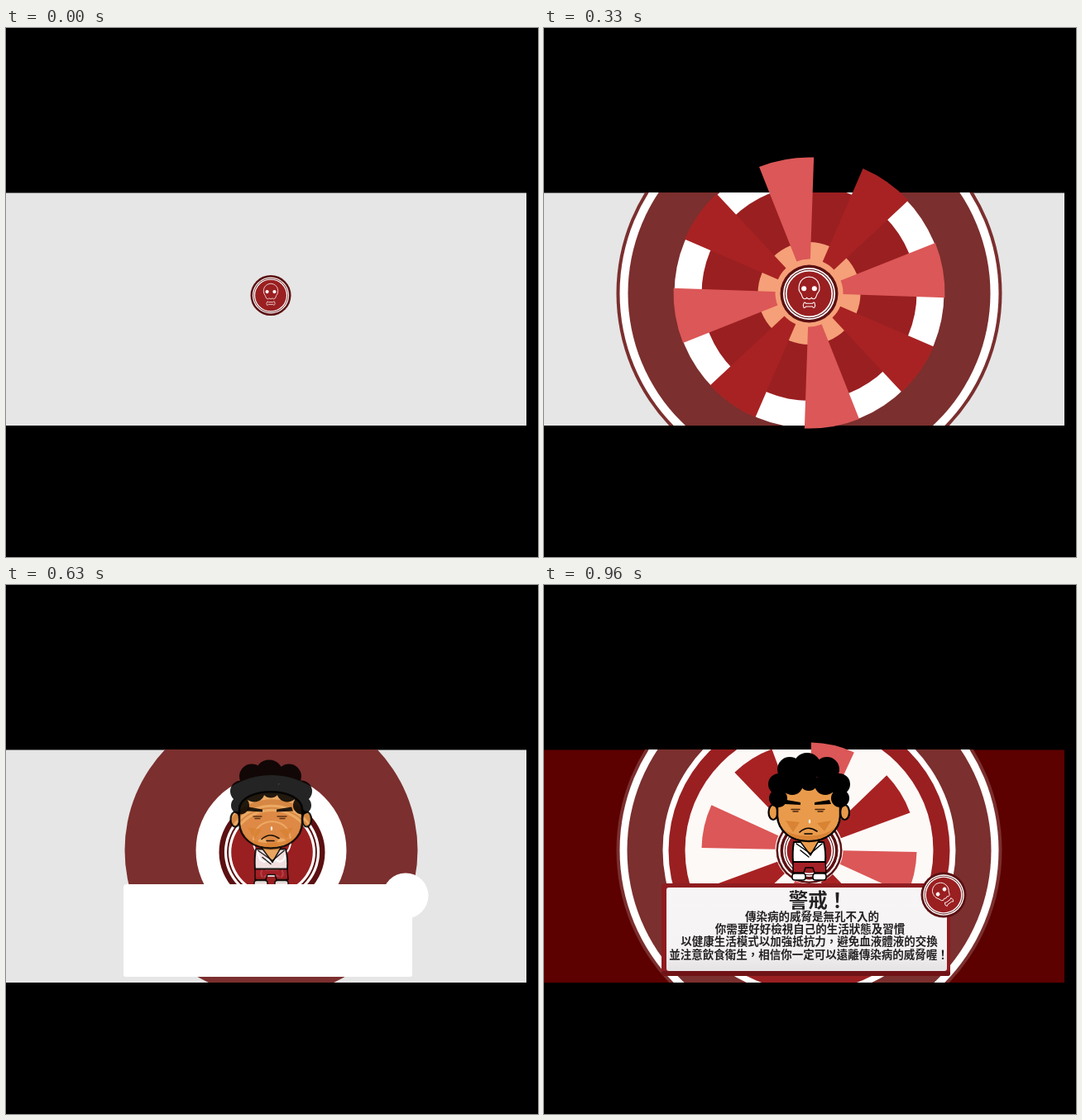
An HTML page with a canvas for the animation above (990 ms loop, 643 px wide and 640 px high).

```html
<!DOCTYPE html>
<html lang="zh-Hant">
<head>
<meta charset="utf-8">
<style>
html, body { margin: 0; width: 100%; height: 100%; overflow: hidden; background: #000; }
canvas { display: block; }
</style>
</head>
<body>
<canvas id="stage" width="643" height="640"></canvas>
<script>
const g = document.getElementById('stage').getContext('2d');
const CX = 320.5, CY = 321, TAU = Math.PI * 2, DEG = Math.PI / 180;
const DARK = '#7b2f2e', RED = '#9a1f21', DEEP = '#5c1012', WHITE = '#ffffff';
const FONT = '"Noto Sans CJK TC", "Noto Sans CJK", sans-serif';

// Piecewise linear lookup over [time, value, time, value, ...]
function at(k, t) {
  if (t <= k[0]) return k[1];
  for (let i = 2; i < k.length; i += 2) {
    if (t <= k[i]) return k[i - 1] + (k[i + 1] - k[i - 1]) * (t - k[i - 2]) / (k[i] - k[i - 2]);
  }
  return k[k.length - 1];
}

function mix(a, b, p) {
  const ch = (c, i) => parseInt(c.slice(i, i + 2), 16);
  return 'rgb(' + [1, 3, 5].map(i => Math.round(ch(a, i) + (ch(b, i) - ch(a, i)) * p)).join() + ')';
}

let tint = 0;
const ink = c => mix(c, WHITE, tint);

function paint(path, fill, line, width = 1.5) {
  if (fill) { g.fillStyle = ink(fill); g.fill(path); }
  if (line) { g.strokeStyle = ink(line); g.lineWidth = width; g.stroke(path); }
}

function oval(x, y, rx, ry = rx) {
  const p = new Path2D();
  p.ellipse(x, y, rx, ry, 0, 0, TAU);
  return p;
}

function box(x, y, w, h, r) {
  const p = new Path2D();
  p.roundRect(x, y, w, h, r);
  return p;
}

const disc = (x, y, r, c) => { if (r > 0) paint(oval(x, y, r), c); };

const skull = new Path2D('M-10 0C-15 -5 -14 -20 0 -21C14 -20 15 -5 10 0L8 5Q5 8 3 5Q0 8 -3 5Q-5 8 -8 5Z');
const bone = new Path2D('M-4 12L4 12Q7 9 7 13Q8 15 7 16Q6 19 4 16L-4 16Q-7 19 -7 16Q-8 14 -7 13Q-6 9 -4 12Z');

function badge(x, y, r, turn = 0) {
  [[1, DEEP], [.9, WHITE], [.85, DEEP], [.82, WHITE], [.77, RED]]
    .forEach(([k, c]) => disc(x, y, r * k, c));
  g.save();
  g.translate(x, y);
  g.rotate(turn * DEG);
  g.scale(r / 36, r / 36);
  paint(skull, null, WHITE, 1.1);
  paint(bone, null, WHITE, 1.1);
  disc(-6.5, -6.5, 3.1, WHITE);
  disc(6.5, -6.5, 3.1, WHITE);
  g.restore();
}

// Expanding discs, painted from the outermost inwards
const discs = [
  [DARK, [0, 24, 30, 75, 90, 177, 150, 224, 180, 232, 210, 233]],
  [WHITE, [30, 0, 90, 91, 180, 200, 210, 224, 300, 229]],
  [DARK, [100, 0, 180, 130, 210, 180, 300, 219, 360, 220]],
  [WHITE, [130, 0, 180, 58, 210, 106, 300, 163, 360, 174, 420, 177]],
  [RED, [180, 0, 210, 49, 300, 130, 360, 160, 420, 170]],
  ['', [250, 0, 300, 62, 360, 116, 420, 150]],
  [DEEP, [300, 0, 390, 40]],
  [WHITE, [300, 0, 390, 37.5]]
];
const wedgeSize = [110, 40, 150, 130, 180, 169, 210, 180, 300, 164, 420, 130];
const badgeSize = [-30, 24.5, 0, 30, 60, 58, 90, 64, 180, 64, 210, 36, 300, 35];

function wheel(L, turn) {
  g.save();
  g.beginPath();
  g.rect(0, 199, 629, 282);
  g.clip();
  const glow = mix('#f5a078', '#fdf9f7', at([300, 0, 400, 1], L));
  for (const [c, k] of discs) {
    const r = at(k, L);
    if (r <= 0 || L < 0) continue;
    g.fillStyle = c || glow;
    g.fill(oval(CX, CY, r));
  }
  g.restore();

  const outer = at(wedgeSize, L), inner = at([180, 46, 300, 41], L);
  if (L > 110) {
    for (let i = 0; i < 8; i++) {
      const mid = (turn + i * 45 - 90) * DEG, half = 11.8 * DEG;
      const p = new Path2D();
      p.arc(CX, 320.5, outer, mid - half, mid + half);
      p.arc(CX, 320.5, inner, mid + half, mid - half, true);
      paint(p, i % 2 ? '#a82223' : '#dc5757');
    }
  }
  badge(at([0, 320, 90, 321.5, 180, 321.5, 210, 320.5], L), at([0, 323.5, 180, 323, 210, 321.5], L), at(badgeSize, L));
}

const hair = new Path2D();
[[318, 220, 17], [297, 223, 15], [342, 223, 15], [284, 241, 13], [357, 241, 13],
 [283, 258, 11], [358, 258, 11], [300, 241, 13], [320, 238, 11], [340, 241, 13]]
  .forEach(([x, y, r]) => { hair.moveTo(x + r, y); hair.arc(x, y, r, 0, TAU); });

const face = new Path2D('M282 262C284 235 356 235 358 262L358 280C357 297 342 310 320 310C298 310 283 297 282 280Z');
const cheeks = new Path2D('M292 285L309 287L301 299ZM330 288L347 285L339 298Z');
const chin = new Path2D('M289 294C298 307 342 307 352 292C345 313 297 314 289 294Z');
const brows = new Path2D('M293 260L310 263L310 266L291 265ZM327 263L345 260L347 265L327 266Z');
const eyes = new Path2D('M299 271.5H309M328 271.5H339M301 274H307M331 274H337');
const mouth = new Path2D('M309 299Q319 290 330 298M315 301H324');
const shirt = new Path2D('M302 311L338 311Q341 322 340 335L301 335Q300 322 302 311Z');
const neck = new Path2D('M308 308L333 308L322 327Z');
const arms = new Path2D('M305 313L322 325L336 313M310 321L320 329');
const shorts = new Path2D('M301 334H340L341 348H327L325 342H316L314 348H301Z');

function man(dy, alpha, white) {
  if (alpha <= 0) return;
  g.save();
  g.translate(0, dy);
  g.globalAlpha = alpha;
  g.lineJoin = g.lineCap = 'round';
  tint = white;
  const skin = '#e99b4b', black = '#000000';
  paint(box(302, 346, 12, 5, 1), skin, black);
  paint(box(327, 346, 12, 5, 1), skin, black);
  paint(box(300, 349, 16, 8, 3), WHITE, black);
  paint(box(325, 349, 16, 8, 3), WHITE, black);
  paint(shorts, '#a52127', black);
  paint(shirt, WHITE, black, 2);
  paint(neck, skin, black);
  paint(arms, null, black);
  paint(oval(277, 275, 5.5, 9), skin, black, 2.2);
  paint(oval(363.5, 275, 5.5, 9), skin, black, 2.2);
  paint(face, skin, black, 2.5);
  paint(chin, '#d98335');
  paint(cheeks, '#d98335');
  paint(hair, black);
  paint(brows, black);
  paint(eyes, null, '#4a2610', 1.4);
  paint(mouth, null, black, 1.6);
  paint(oval(321, 286, 1.2, 2.5), WHITE);
  g.restore();
  tint = 0;
}

const lines = [
  [324, 40, '傳染病的威脅是無孔不入的'],
  [321.5, 54.5, '你需要好好檢視自己的生活狀態及習慣'],
  [320.5, 70, '以健康生活模式以加強抵抗力，避免血液體液的交換'],
  [320, 86, '並注意飲食衛生，相信你一定可以遠離傳染病的威脅喔！']
];

function card(y, alpha, inner, white) {
  if (alpha <= 0) return;
  g.save();
  g.translate(0, y);
  g.globalAlpha = alpha;
  tint = white;
  paint(box(142, 0, 349, 112, 4), '#8f1c20');
  paint(box(142, 106, 349, 6, 3), '#701317');
  g.globalAlpha = alpha * inner;
  const shade = g.createLinearGradient(0, 4, 0, 106);
  shade.addColorStop(0, ink('#f7f5f6'));
  shade.addColorStop(.72, ink('#f5f3f4'));
  shade.addColorStop(1, ink('#e6e3e4'));
  g.fillStyle = shade;
  g.fill(box(148, 5, 339, 101, 3));
  g.globalAlpha = alpha;
  g.fillStyle = ink('#242122');
  g.textAlign = 'center';
  g.textBaseline = 'middle';
  g.font = '900 23.5px ' + FONT;
  g.fillText('警戒！', 331, 20);
  g.font = '900 13.5px ' + FONT;
  for (const [x, dy, s] of lines) g.fillText(s, x, dy);
  badge(483, 14, 27.5, -37);
  g.restore();
  tint = 0;
}

function draw(t) {
  g.fillStyle = '#000';
  g.fillRect(0, 0, 643, 640);
  g.fillStyle = mix('#e6e6e6', '#5c0000', at([640, 0, 960, 1], t));
  g.fillRect(0, 199.5, 629, 281.5);

  const again = t >= 555;
  wheel(again ? t - 540 : t - 30,
    again ? at([600, -88, 720, 3.6, 840, 95.1, 960, 192.9], t) : 7 + (t - 240) * .813);
  man(at([540, 0, 570, 12, 630, 8.5, 720, 0], t),
    at([405, 0, 450, .96, 540, 1, 570, .6, 630, .86, 690, 1], t),
    again ? 0 : at([450, .95, 540, .5], t));
  card(at([390, 394, 450, 382, 540, 366, 630, 362, 690, 367.5, 720, 367, 960, 361], t),
    at([405, 0, 450, .62, 510, 1], t),
    at([450, .06, 540, 1], t),
    at([405, .5, 450, .45, 540, 1, 640, 1, 720, .5, 840, .02, 870, 0], t));
}

function tick(now) {
  draw(Math.floor(now % 990 / 30) * 30);
  requestAnimationFrame(tick);
}
draw(0);
requestAnimationFrame(tick);
</script>
</body>
</html>
```
